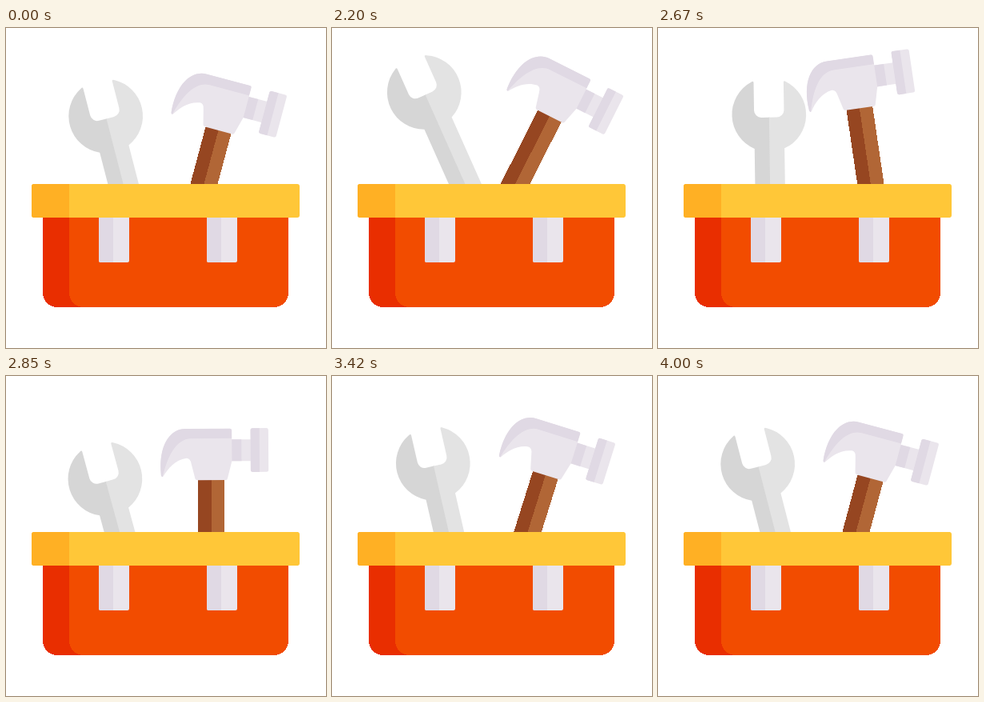
Animation, 400 px wide and 400 px high, one loop 4.02 s. Source, as an HTML page:

```html
<!DOCTYPE html>
<html lang="en">
<head>
<meta charset="utf-8">
<title>Toolbox</title>
<style>
  html, body { margin: 0; width: 100%; height: 100%; overflow: hidden; background: #fff; }
  svg { display: block; width: 100%; height: 100%; }
  .steel-dark { fill: #d6d6d6; }
  .steel { fill: #e3e3e3; }
  .metal-dark { fill: #e0d9e4; }
  .metal { fill: #eae5ec; }
  .crisp { shape-rendering: crispEdges; }
</style>
</head>
<body>
<svg viewBox="0 0 400 400">
  <defs>
    <path id="half" d="M0 3.5H9.7A9 9 0 0 0 18.7 -5.5V-40Q18.7 -42.8 21.5 -41A46.3 46.3 0 0 1 18.7 42.4V200H0Z"/>
    <path id="head" d="M-17 .5H18.5Q20 .5 20.5 -2L26 -23V-61Q26 -63.7 23.5 -63.7H-32C-52 -63.7 -66 -42 -62.7 -6Q-62 -3 -60 -4.5C-54 -14 -45 -25 -31 -27Q-26 -27 -24.8 -20L-20 -1Q-19.3 .5 -17 .5Z"/>
    <clipPath id="headClip"><use href="#head"/></clipPath>
    <clipPath id="faceClip"><rect x="49.3" y="-64" width="22.4" height="54.7" rx="2.5"/></clipPath>
    <clipPath id="lidClip"><rect x="32" y="195" width="335" height="42" rx="3"/></clipPath>
    <g id="clasp">
      <path class="metal" d="M0 237H38V290.5Q38 293 35.5 293H2.5Q0 293 0 290.5Z"/>
      <path class="metal-dark" d="M0 237H18V293H2.5Q0 293 0 290.5Z"/>
    </g>
  </defs>

  <g id="wrench" transform="translate(0 -60)">
    <use href="#half" class="steel-dark" transform="scale(-1 1)"/>
    <rect class="steel-dark" x="-1" y="3.5" width="2" height="196"/>
    <use href="#half" class="steel"/>
  </g>

  <g id="hammer" transform="translate(0 -34)">
    <g class="crisp">
      <rect x="-16.5" y="-2" width="33" height="200" fill="#b16636"/>
      <rect x="-16.5" y="-2" width="16.5" height="200" fill="#964621"/>
    </g>
    <rect class="metal" x="25" y="-50" width="25" height="27"/>
    <rect class="metal-dark" x="25" y="-50" width="13" height="27"/>
    <g clip-path="url(#faceClip)">
      <rect class="metal" x="49" y="-65" width="24" height="57"/>
      <rect class="metal-dark" x="49" y="-65" width="11.5" height="57"/>
    </g>
    <use href="#head" class="metal"/>
    <path class="metal-dark" clip-path="url(#headClip)" d="M-61 -3C-55 -28 -44 -51.5 -25 -51.5H27V-66H-68V-3Z"/>
  </g>

  <g class="crisp">
    <path d="M46 236H110V349H64A18 18 0 0 1 46 331Z" fill="#e92e00"/>
    <path d="M79 236H353V331A18 18 0 0 1 335 349H97A18 18 0 0 1 79 331Z" fill="#f24c00"/>
  </g>
  <g clip-path="url(#lidClip)">
    <rect x="32" y="195" width="335" height="42" fill="#ffc738"/>
    <rect x="32" y="195" width="47" height="42" fill="#ffb024"/>
  </g>
  <use href="#clasp" x="116"/>
  <use href="#clasp" x="251"/>
</svg>
<script>
const LOOP = 4020, START = 2000, END = 4000;
const SINE = 'cubic-bezier(.37, 0, .63, 1)';
const SINE_OUT = 'cubic-bezier(.61, 1, .88, 1)'.replace('.61, 1, .88, 1', '.39, .575, .565, 1');

// Rests until START, eases through the [ms, offset] turning points, rests again at END.
function swing(el, prop, launch, turns, pose) {
  const path = [[0, 0], [START, 0], ...turns, [END, 0], [LOOP, 0]];
  const frames = path.map(([ms, offset]) => ({
    offset: ms / LOOP,
    [prop]: pose(offset),
    easing: ms === START ? launch : SINE
  }));
  el.animate(frames, { duration: LOOP, iterations: Infinity });
}

function addTool(id, x, y, tilt, turns, lifts) {
  const el = document.getElementById(id);
  swing(el, 'rotate', SINE_OUT, turns, d => `${tilt + d}deg`);
  swing(el, 'translate', SINE, lifts, d => `${x}px ${y + d}px`);
}

addTool('wrench', 139.7, 168.1, -14.5,
  [[2170, -10], [2550, 18], [2970, -5], [3380, 1.6]],
  [[2370, -58], [2820, 19], [3100, -4.5], [3500, 0]]);

addTool('hammer', 256.8, 160.3, 15,
  [[2170, 12], [2670, -23.4], [3190, 6.5], [3450, 2.3]],
  [[2440, -47], [3070, 21.6], [3460, -5]]);
</script>
</body>
</html>
```
